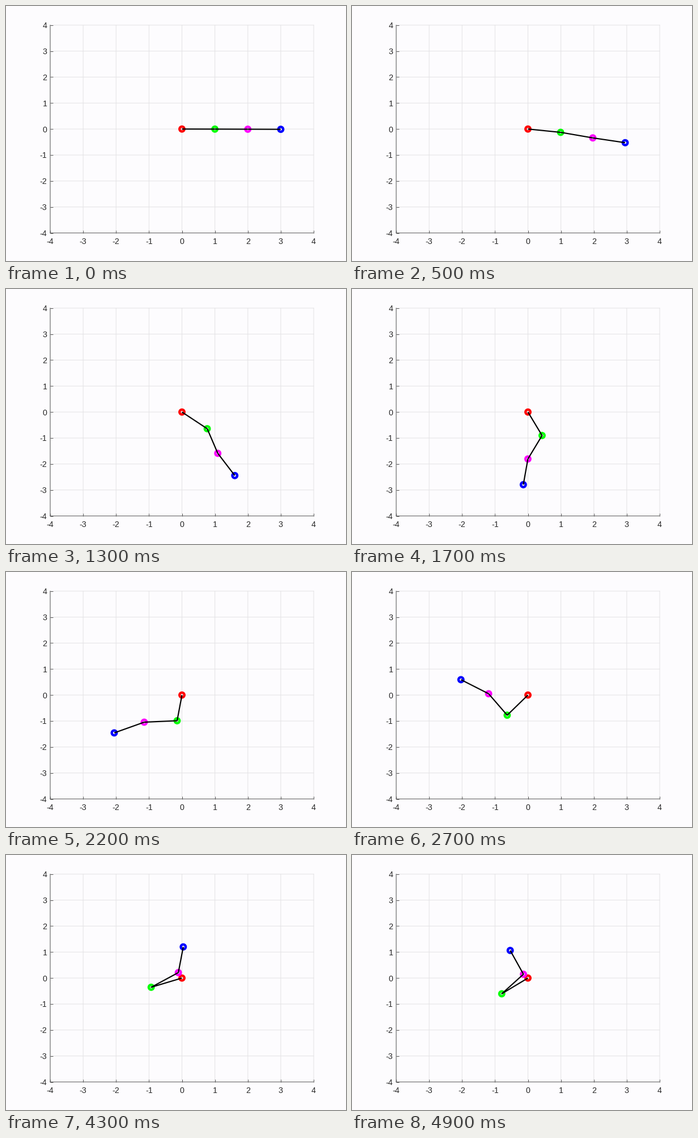
A matplotlib script that plays this animation: 600 px wide and 450 px high, repeating every 5000 ms.

```python
import numpy as np
import matplotlib.pyplot as plt
from matplotlib.animation import FuncAnimation

DPI = 100
FRAMES, INTERVAL = 50, 100
PT = 72 / DPI  # points per pixel
BACKGROUND, INK, AXIS, GRID = "#fdfcfe", "#262626", "#5a5a5a", "#e4e3e5"
JOINT_COLORS = ["#ff0000", "#00ff00", "#ff00ff", "#0000ff"]

# Joint angles in degrees, each relative to the link before it.
KEY_TIMES = np.array([0.9, 1.7, 2.7, 3.5, 4.3, 4.9])
KEY_ANGLES = np.array([
    [-20.4, -64.6, -129.1, -157.9, -159.2, -142.7],
    [-15.6, -50.9, -106.6, -145.9, -166.4, -168.5],
    [6.4, 17.5, 22.9, 29.5, 47.0, 64.9],
])
START = 0.08  # the arm has already moved a little when the loop begins

# The arm starts at rest, so every angle is t^2 times a smooth polynomial.
key_t = KEY_TIMES + START
curves = [np.polyfit(key_t, angles / key_t**2, 5) for angles in KEY_ANGLES]


def arm_points(frame):
    t = frame * INTERVAL / 1000 + START
    joints = [t**2 * np.polyval(curve, t) for curve in curves]
    headings = np.radians(np.cumsum(joints))
    x = np.concatenate([[0], np.cumsum(np.cos(headings))])
    y = np.concatenate([[0], np.cumsum(np.sin(headings))])
    return x, y


plt.rcParams["font.family"] = "Liberation Sans"
fig = plt.figure(figsize=(6, 4.5), dpi=DPI, facecolor=BACKGROUND)
ax = fig.add_axes([0.13, 0.11, 0.775, 0.815], facecolor=BACKGROUND)
ax.set(xlim=(-4, 4), ylim=(-4, 4))
ticks = range(-4, 5)
labels = [str(v) for v in ticks]
ax.set_xticks(ticks, labels=labels)
ax.set_yticks(ticks, labels=labels)
ax.grid(color=GRID, linewidth=PT, clip_on=False, snap=False)
ax.set_axisbelow(True)
ax.tick_params(direction="in", length=4.65 * PT, width=PT,
               color=AXIS, labelcolor=INK, labelsize=10.3)
ax.tick_params(axis="x", pad=6)
ax.tick_params(axis="y", pad=4)
ax.spines[["top", "right"]].set_visible(False)
for side in ("left", "bottom"):
    ax.spines[side].set(color=AXIS, linewidth=PT, snap=False)

# A collection keeps the rings at subpixel positions.
rings = ax.scatter(np.zeros(4), np.zeros(4), s=(8.57 * PT) ** 2,
                   facecolors="none", edgecolors=JOINT_COLORS,
                   linewidths=4.3 * PT, zorder=3)
arm, = ax.plot([], [], color="black", linewidth=2.15 * PT, snap=False,
               solid_capstyle="butt", solid_joinstyle="round", zorder=4)


def draw(frame):
    x, y = arm_points(frame)
    arm.set_data(x, y)
    rings.set_offsets(np.column_stack([x, y]))
    return rings, arm


anim = FuncAnimation(fig, draw, frames=FRAMES, interval=INTERVAL,
                     repeat=True, repeat_delay=0, blit=False)
plt.show()
```
